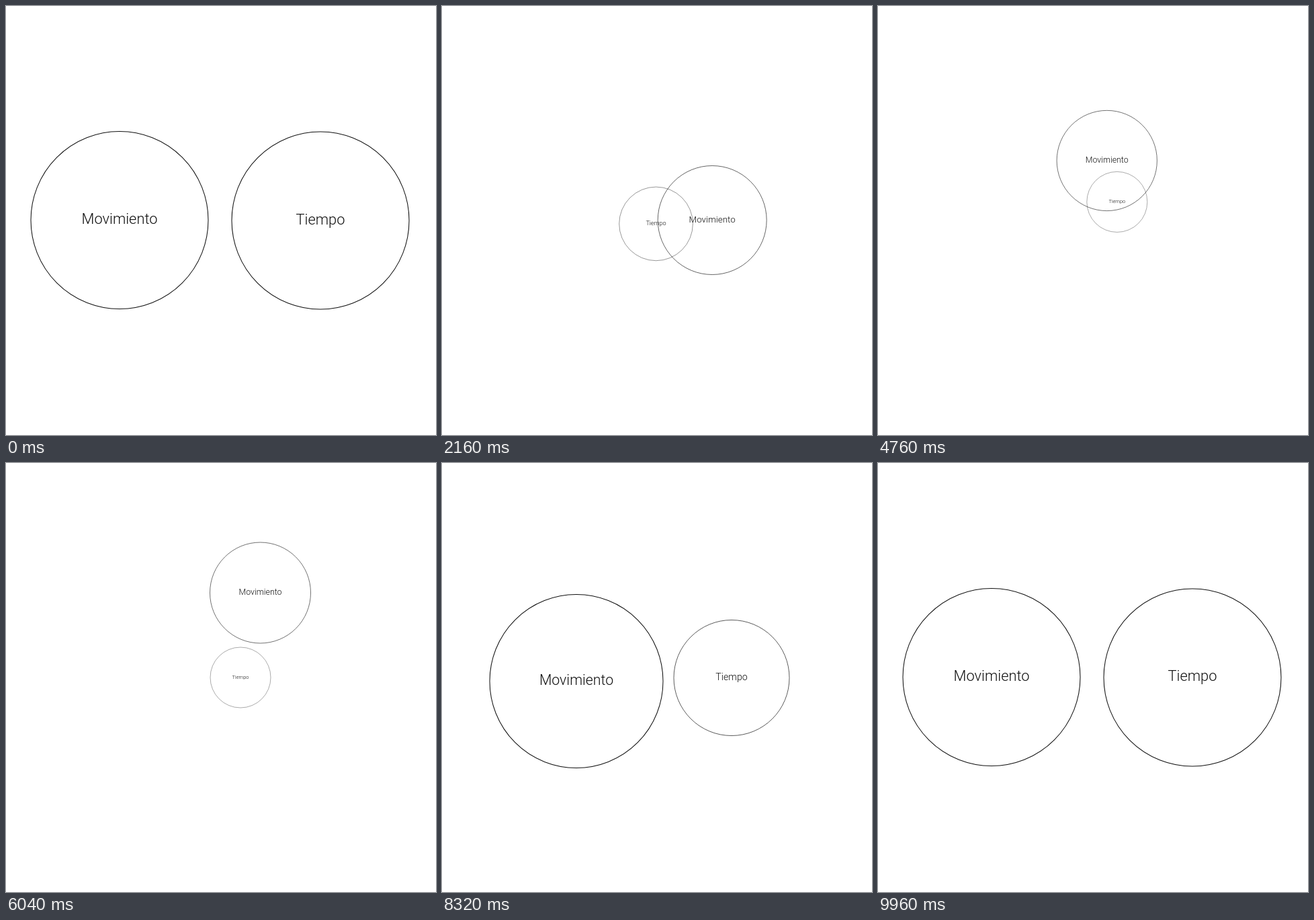
An HTML page with a canvas for the animation above (10 s loop, 640 by 638 pixels).

```html
<!DOCTYPE html>
<html lang="es">
<head>
<meta charset="utf-8">
<title>Movimiento y tiempo</title>
<style>
  html, body { margin: 0; width: 100%; height: 100%; overflow: hidden; background: #fff; }
  canvas { display: block; width: 640px; height: 638px; }
</style>
</head>
<body>
<canvas id="stage" width="640" height="638"></canvas>
<script>
const LOOP = 10000, STEP = 40, FULL_RADIUS = 132;
const ctx = document.getElementById('stage').getContext('2d');

// Each key: time in ms, centre x, centre y, radius
const discs = [
  { label: 'Movimiento', keys: [
    [0, 169, 318.5, 132],
    [1040, 337.5, 318.5, 129.5],
    [1120, 341, 318.5, 129],
    [1600, 376, 318.5, 106],
    [2080, 401, 318.5, 82],
    [3120, 409, 318.5, 75],
    [3680, 409, 318, 74.3],
    [4160, 393, 300, 74.3],
    [4620, 338.5, 246, 74.5],
    [5200, 359, 194, 75],
    [6040, 378.5, 193, 75],
    [6240, 391, 194.5, 75],
    [6700, 484, 262, 79],
    [7000, 425, 332, 83],
    [7280, 320.5, 340, 88],
    [7480, 274, 336.5, 93],
    [8320, 200, 324.5, 129],
    [9080, 176.5, 320, 131.3]
  ] },
  { label: 'Tiempo', keys: [
    [0, 468, 319, 132],
    [1040, 456, 330.5, 128],
    [1120, 453, 332.5, 127.5],
    [1520, 422, 393, 102],
    [1800, 366, 385, 76],
    [2080, 325, 341, 58],
    [2320, 313, 292, 51],
    [3120, 340, 245, 45.3],
    [3680, 343, 245, 45],
    [4600, 356, 282, 45],
    [5240, 354, 316, 45],
    [6040, 349, 319, 45],
    [7480, 386, 319.5, 46],
    [8320, 431, 319.5, 86],
    [9080, 466.5, 319, 127.5]
  ] }
];

// Keys wrap around the loop in both directions
function keyAt(keys, i) {
  const n = keys.length, turn = Math.floor(i / n);
  const [t, ...pose] = keys[i - turn * n];
  return [t + turn * LOOP, ...pose];
}

// Tangent that never overshoots its neighbouring keys
function tangent(a, b, c, k) {
  const h1 = b[0] - a[0], h2 = c[0] - b[0];
  const s1 = (b[k] - a[k]) / h1, s2 = (c[k] - b[k]) / h2;
  if (s1 * s2 <= 0) return 0;
  const mean = (s1 * h2 + s2 * h1) / (h1 + h2);
  return Math.sign(s1) * Math.min(2 * Math.abs(s1), 2 * Math.abs(s2), Math.abs(mean));
}

function poseAt(keys, time) {
  const next = keys.findIndex(key => key[0] > time);
  const i = (next < 0 ? keys.length : next) - 1;
  const [a, b, c, d] = [-1, 0, 1, 2].map(o => keyAt(keys, i + o));
  const h = c[0] - b[0], u = (time - b[0]) / h, v = 1 - u;
  return [1, 2, 3].map(k =>
    v * v * (1 + 2 * u) * b[k] + u * u * (3 - 2 * u) * c[k] +
    h * u * v * (v * tangent(a, b, c, k) - u * tangent(b, c, d, k)));
}

function drawDisc({ label, keys }, time) {
  const [x, y, radius] = poseAt(keys, time);
  const scale = radius / FULL_RADIUS;
  ctx.save();
  ctx.translate(x, y);
  ctx.scale(scale, scale);
  ctx.beginPath();
  ctx.arc(0, 0, FULL_RADIUS, 0, Math.PI * 2);
  ctx.stroke();
  ctx.fillText(label, 0, 5.5);
  ctx.restore();
}

function render(now) {
  const time = Math.floor((now % LOOP) / STEP) * STEP;
  ctx.fillStyle = '#fff';
  ctx.fillRect(0, 0, 640, 638);
  ctx.fillStyle = ctx.strokeStyle = '#111';
  ctx.lineWidth = 1.05;
  ctx.font = '300 21.8px Roboto, "Open Sans", sans-serif';
  ctx.textAlign = 'center';
  for (const disc of discs) drawDisc(disc, time);
}

const start = performance.now();
function tick() {
  render(performance.now() - start);
  requestAnimationFrame(tick);
}
tick();
</script>
</body>
</html>
```
